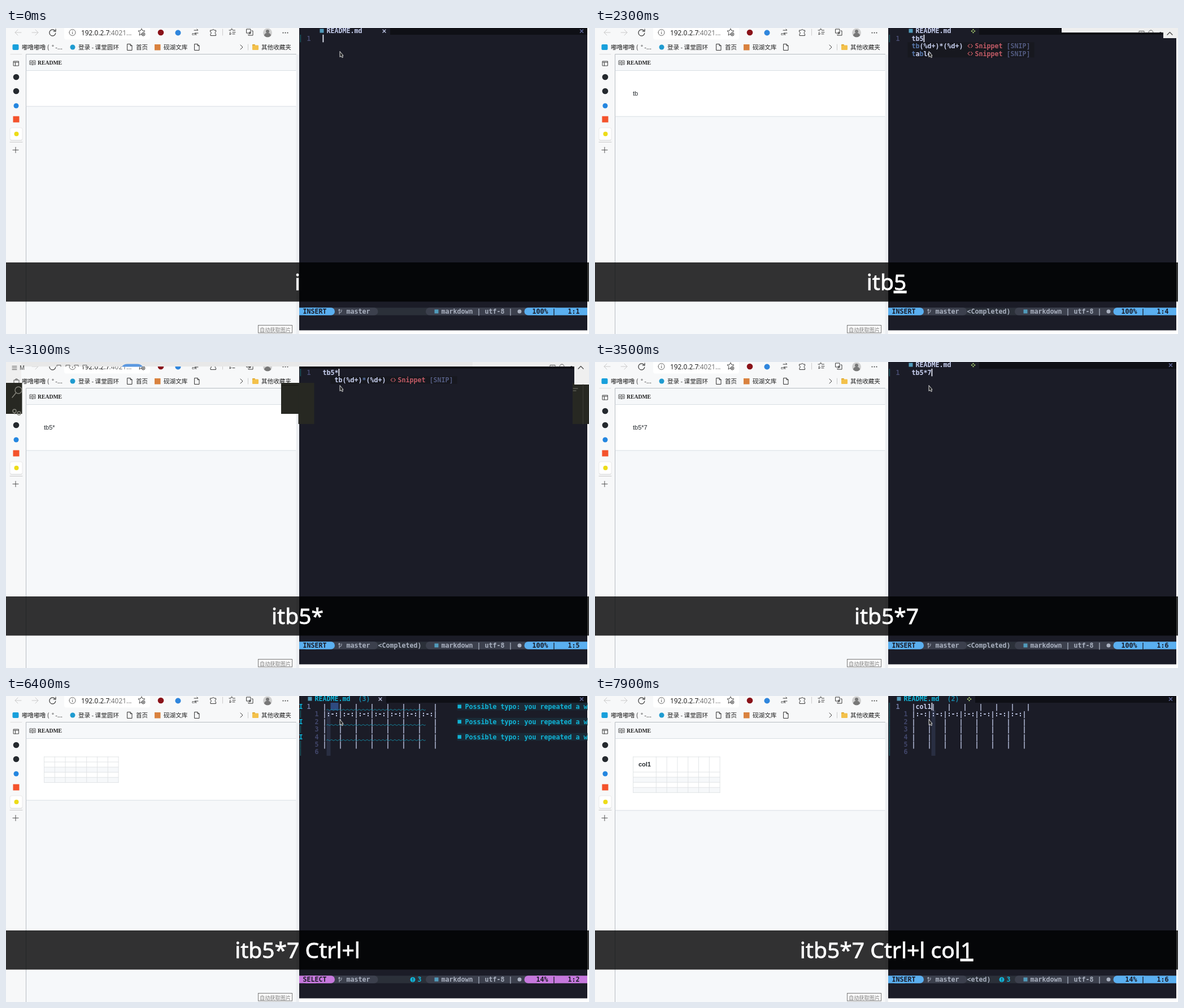
Recreate the animation shown at these times as an HTML page. Size 1032x543 px, loop 8000 ms.

```html
<!DOCTYPE html>
<html lang="zh">
<head>
<meta charset="utf-8">
<title>Table snippet</title>
<style>
html, body { margin: 0; width: 100%; height: 100%; overflow: hidden; background: #fff; }
svg { display: block; }
text { white-space: pre; }
.m { font: bold 11.63px "DejaVu Sans Mono", monospace; }
.ui { font-family: "Noto Sans", "Open Sans", sans-serif; }
.zh { font-family: "Noto Sans CJK SC", "Noto Sans CJK", sans-serif; }
.doc { font-family: "Liberation Sans", Arial, sans-serif; }
.serif { font-family: "Liberation Serif", serif; font-weight: bold; }
.keys { font: 39px "Noto Sans", "Open Sans", sans-serif; stroke: #fff; stroke-width: .8px; }
.last { text-decoration: underline; text-decoration-thickness: 2px; text-underline-offset: 3px; }
.ln { fill: none; stroke-linecap: round; stroke-linejoin: round; }
</style>
</head>
<body>
<svg id="stage" width="1032" height="543" viewBox="0 0 1032 543"><g id="base"></g><g id="live"></g></svg>
<script>
const LOOP = 8000, CW = 7, RH = 13.46, X0 = 518.5;
const BG = '#1b1c27', FG = '#c8d0f0', CYAN = '#10b3d6', BLUE = '#5aaff0', TEAL = '#519aba', DIM = '#525a80';
const esc = s => s.replace(/&/g, '&amp;').replace(/</g, '&lt;');
const rect = (x, y, w, h, fill, more = '') => `<rect x="${x}" y="${y}" width="${w}" height="${h}" fill="${fill}" ${more}/>`;
const dot = (x, y, r, fill) => `<circle cx="${x}" cy="${y}" r="${r}" fill="${fill}"/>`;
const line = (d, color, w = 1) => `<path class="ln" d="${d}" stroke="${color}" stroke-width="${w}"/>`;
const text = (x, y, s, size, fill, cls, more = '') =>
  `<text class="${cls}" x="${x}" y="${y}" font-size="${size}" fill="${fill}" ${more}>${esc(s)}</text>`;
const colX = c => X0 + c * CW;
const rowY = r => r * RH - 1.6;
const mono = (c, r, s, fill) => `<text class="m" x="${colX(c)}" y="${9.2 + r * RH}" fill="${fill}">${esc(s)}</text>`;
const cross = (x, y, r, color, w = 1.2) => line(`M${x - r} ${y - r}l${2 * r} ${2 * r}m0 ${-2 * r}l${-2 * r} ${2 * r}`, color, w);
const ring = (x, y, r) => `M${x - r} ${y}a${r} ${r} 0 1 0 ${2 * r} 0a${r} ${r} 0 1 0 ${-2 * r} 0`;
const sheet = x => line(`M${x - 4} 28.5h5l3 3v8h-8zm5 0v3h3`, '#333');

// ---- fixed parts ----
function browser() {
  const ink = '#3a3a3a', pale = '#c9c9c9';
  return rect(0, 0, 519, 543, '#f7f8f9') + rect(36, 47, 477, 496, '#f6f8fa') +
    rect(513.5, 47, 5, 496, '#eceef1') +
    rect(103, -10, 152, 30.5, '#fff', 'rx="4"') +
    line('M27 8h-11m5-5l-5 5l5 5M46 8h11m-5-5l5 5l-5 5', pale) +
    line('M87 5.5a5.5 5.5 0 1 0 .8 3.5M88 2v4h-4', ink, 1.2) +
    line(ring(117.5, 8, 5.5) + 'M117.5 7.5v3M117.5 5v.3', '#666') +
    text(133, 12.7, '192.0.2.7', 11.9, '#222', 'ui') +
    text(182.6, 12.7, ':4021...', 11.9, '#777', 'ui') +
    line('M244 7l2-2h-4l-2-4l-2 4h-4l3 3.500l-1 4.500l3.500-2' + ring(243, 11, 3) + 'M241.500 11h3M243 9.500v3', '#444') +
    dot(274, 8, 5.3, '#8a1219') + dot(304.5, 8.500, 5, '#2f86dd') +
    text(329, 13, 'en', 7, ink, 'ui') + line('M333 4h7l-2-2M340 9h-6l2 3', ink) +
    line('M362 4h3a1.800 1.800 0 0 1 3.500 0h3v3a1.800 1.800 0 0 0 0 3.500v3h-9.500v-3a1.800 1.800 0 0 0 0-3.500z', ink) +
    line('M383.5 2v11', '#ccc') +
    line('M395 4h3l1.500-3l2 3h4M397 7l-1 5l3-2M401 7.500h5M401 10.500h4', ink) +
    line('M426 2h7v7h-7zM429 11.500v1.500h8v-8h-2M431.500 7v4m-2-2h4', ink) +
    dot(463, 8.500, 8, '#cfcfcf') + dot(463, 6, 3, '#777') + `<path d="M457 13.500a6 5 0 0 1 12 0a8 8 0 0 1-12 0" fill="#777"/>` +
    [490.5, 494.5, 498.5].map(x => dot(x, 8.500, 1, ink)).join('') +
    rect(11.5, 29, 11, 10, '#18a0dc', 'rx="2"') +
    text(28, 38, '嘟噜嘟噜 (  ° -...', 10.6, '#222', 'zh') +
    dot(118, 34, 4.5, '#1f9bd0') + text(128, 38, '登录 - 课堂圆环', 10.6, '#222', 'zh') +
    sheet(219) + text(230, 38, '首页', 10.6, '#222', 'zh') +
    rect(263, 29, 10.5, 10.5, '#d9823f') + text(279, 38, '砚湖文库', 10.6, '#222', 'zh') + sheet(338) +
    line('M415 30l4 4l-4 4', ink) + line('M428.5 29v10', '#ccc') +
    rect(436, 29, 5, 4, '#d9a02c', 'rx="1"') + rect(436, 30.5, 11, 8.500, '#f3c14b', 'rx="1"') +
    text(452, 38, '其他收藏夹', 10.6, '#222', 'zh') +
    line('M35.500 543V46.500H513.500', '#b8bdc2') + line('M8 46.500h20', '#ddd') +
    line('M13.500 59h9v8h-9zm0 2h9m-6 0v6', '#444') +
    dot(18, 87, 5.3, '#24292e') + dot(18, 112, 5.3, '#24292e') + dot(18, 138, 4.500, '#2386e0') +
    rect(12.5, 156.500, 11, 11, '#f4532c') +
    rect(7, 178, 22, 22, '#00000022', 'rx="3"') + rect(7, 177, 22, 22, '#fff', 'rx="3" stroke="#ddd" stroke-width=".6"') +
    dot(18.5, 188, 4, '#eddc18') + line('M7 202.500h22', '#c8c8c8') + line('M12 216.500h10m-5-5v10', '#555') +
    line('M36 75.500h477', '#d8dee4') +
    line('M47 58.500q-2.500-1.500-5-.500v7q2.500-1 5 .500q2.500-1.500 5-.500v-7q-2.500-1-5 .500v7M43.500 60.500h2m-2 2h2m3-2h2m-2 2h2', '#444', .9) +
    text(56, 64.8, 'README', 9.7, '#222', 'serif') +
    rect(446.5, 527.5, 60, 13.500, '#fff', 'stroke="#777"') + text(449, 538.5, '自动获取图片', 9.2, '#777', 'zh');
}

// ---- page preview ----
const pen = document.createElement('canvas').getContext('2d');
pen.font = 'bold 11px "Liberation Sans", Arial, sans-serif';

function grid(cell) {
  const step = 18.8, left = 67.5, top = 108;
  const head = cell ? 27 : 9.1, first = step + (cell ? pen.measureText(cell).width : 0);
  const w = first + 6 * step, h = head + 4 * 9.1, y = i => top + head + i * 9.1;
  let out = rect(left, y(1), w, 9.1, '#f6f8fa') + rect(left, y(3), w, 9.1, '#f6f8fa'), d = `M${left} ${top}h${w}`;
  for (let i = 0; i < 5; i++) d += `M${left} ${y(i)}h${w}`;
  d += `M${left} ${top}v${h}`;
  for (let i = 0; i < 7; i++) d += `M${left + first + i * step} ${top}v${h}`;
  return out + line(d, '#dfe2e5', .9) +
    (cell ? text(left + 9.4, 125, cell, 11, '#24292e', 'doc', 'font-weight="bold"') : '');
}

function preview(s) {
  const bottom = s.table ? (s.doc ? 203 : 185) : s.doc ? 157 : 139;
  return rect(36, 76, 477.5, bottom - 76, '#fff') + line(`M36 ${bottom}h477`, '#d8dee4') +
    (s.table ? grid(s.doc) : text(67, 120, s.doc, 11, '#24292e', 'doc'));
}

// ---- editor ----
const SIZES = ['3x3', '5x1', '3x1', '4x1', '2x2', '4x3', '3x2', '4x2'];
const MENUS = {
  t: ['task', 'task1', 'task2', 'task3', 'task4', 'table', 'tb(%d+)*(%d+)', ...SIZES.map(n => n + 'table')],
  tb: ['tb(%d+)*(%d+)', 'table'],
  '*': ['tb(%d+)*(%d+)']
};

function marked(c, r, label, query) {
  let q = query;
  const spans = [...label].map(ch => {
    const hit = ch === q[0];
    if (hit) q = q.slice(1);
    return `<tspan fill="${hit ? '#5878ad' : FG}">${ch}</tspan>`;
  }).join('');
  return `<text class="m" x="${colX(c)}" y="${9.2 + r * RH}">${spans}</text>`;
}

function menu(query) {
  const items = MENUS[query], c = query === '*' ? 9 : 6, x = colX(c), h = items.length * RH;
  let out = rect(x - 7, rowY(2), 224, h, '#17181f');
  if (items.length > 9) out += rect(x + 217, rowY(2), 7, h, '#17181f') + rect(x + 217, rowY(2), 7, 162, '#3b4261');
  items.forEach((label, i) => {
    const y = 5 + (i + 2) * RH;
    out += marked(c, i + 2, label, query) +
      line(`M${x + 102.500} ${y - 3}l-3 3l3 3M${x + 105} ${y - 3}l3 3l-3 3`, '#c05a62', 1.2) +
      mono(c + 16, i + 2, 'Snippet', '#c05a66') + mono(c + 24, i + 2, '[SNIP]', DIM);
  });
  return out;
}

function tabline(s) {
  const c = s.count ? 4 : 7, end = s.count ? 673 : 680, x = s.count ? 662.5 : 669.5;
  const name = s.count ? CYAN : FG;
  return rect(end, 0, 1029 - end, 12, '#0f1016') + rect(colX(c) - 12, 1.5, 7, 7, TEAL) +
    mono(c, 0, 'README.md', name) + (s.count ? mono(15, 0, `(${s.count})`, '#1788a8') : '') +
    (s.mod ? [[0, -2.5], [0, 2.5], [-2.5, 0], [2.5, 0]].map(p => dot(x + p[0], 5.5 + p[1], 1.2, '#a3c76d')).join('')
      : cross(x, 5.5, 2.5, FG)) +
    cross(1019, 5.5, 2.5, '#5a6292', 1.7);
}

const curl = (x, r, n) => line(`M${x} ${rowY(r + 1) - .8}` + 'q1.75 -2 3.5 0t3.5 0'.repeat(n), '#1590ab', .9);
const hint = (r, s) => rect(colX(40), rowY(r), 231, RH, '#1a2b37') + rect(799.5, r * RH + 2, 6.500, 6.500, CYAN) +
  mono(42, r, s, CYAN);

function tableText(s) {
  const select = s.mode === 'SELECT', col = 7 + s.cell.length;
  const notes = !select ? [] : s.diag === 1 ? [1] : [1, 3, 5];
  let out = rect(colX(col), rowY(2), 7, 6 * RH, '#292e42');
  if (select) out += rect(colX(8), rowY(1), 14, RH, '#2e4a80');
  for (let r = 1; r < 8; r++) {
    out += notes.includes(r) ? mono(0, r, 'I', CYAN) : rect(520.5, rowY(r), 1.6, RH, '#215a63');
    out += r === 1 ? mono(2, 1, '1', '#7077a0') : mono(4, r, String(r - 1), '#41466a');
    if (r === 7) continue;
    const body = r === 2 ? '|' + ':-:|'.repeat(7) : '|' + '   |'.repeat(7);
    out += mono(6, r, r === 1 && !select ? `|${s.cell}|` + '   |'.repeat(6) : body, FG);
  }
  notes.forEach(r => {
    out += s.diag === 1 ? curl(colX(6), r, 3) + hint(r, 'This sentence does not start wi')
      : curl(colX(7), r, 25) + hint(r, 'Possible typo: you repeated a w');
  });
  if (s.cur) out += rect(colX(col), rowY(1), select ? 7 : 1.8, RH, '#d5d9e8');
  return out;
}

function lineText(s) {
  return rect(520.5, rowY(1), 1.6, RH, '#215a63') + mono(2, 1, '1', '#484b70') + mono(6, 1, s.text, FG) +
    (s.cur ? rect(colX(6 + s.text.length), rowY(1), 1.8, RH, '#e6e9f5') : '') + (s.menu ? menu(s.menu) : '');
}

function status(s) {
  const y = 496.3, h = 13.4, pill = s.mode === 'SELECT' ? '#c678dd' : BLUE, gray = '#a9b0bf', seg = '#3c404d';
  const at = s.table ? s.cell.length + 2 : s.text.length + 1;
  return rect(519, y, 510, h, '#2b3039') + rect(560, y, 98.500, h, seg, 'rx="6.7"') + rect(743, y, 200, h, seg, 'rx="6.7"') +
    rect(519, y, 30, h, pill) + rect(525, y, 57, h, pill, 'rx="6.7"') +
    rect(917.5, y, 60, h, pill, 'rx="6.7"') + rect(940, y, 89, h, pill) +
    mono(1, 37, s.mode, BG) + line('M590 499v8.500m0-2q4-1 4-4v-1.500m-5.500 1l1.500-2l1.500 2', gray, 1.1) + mono(12, 37, 'master', gray) +
    mono(20, 37, s.msg, gray) +
    (s.diag ? dot(720, 503.200, 4.500, CYAN) + rect(719.4, 500.5, 1.300, 3.500, '#2b3039') + rect(719.4, 505, 1.300, 1.300, '#2b3039') +
      mono(30, 37, String(s.diag), CYAN) : '') +
    rect(758.5, 499.500, 7, 7, TEAL) + mono(36, 37, 'markdown | utf-8 |', gray) + dot(909, 503, 3.500, gray) +
    (s.table ? mono(60, 37, '14%', BG) : mono(59, 37, '100%', BG)) + mono(64, 37, '|', BG) + mono(68, 37, '1:' + at, BG);
}

const editor = s => rect(519, 0, 510, 536.5, BG) + tabline(s) + (s.table ? tableText(s) : lineText(s)) + status(s);

// ---- torn pieces of other windows ----
const DARK = '#272822', LIGHT = '#efefef';

function corner() {
  return rect(826, 0, 181, 8, LIGHT) + rect(1006, 0, 26, 18, LIGHT) +
    line('M963 8v-2.500h9v2.500M966 8h3M980 8a4 4 0 0 1 8 0M1000 7.500h2', '#555') + line('M1013 12l4.500-4.500l4.500 4.500', '#444', 1.2);
}

function tabStrip() {
  const label = (x, s, fill) => text(x, 12, s, 11, fill, 'ui');
  const tabs = [[116, 'plugins.lua', '.../lang', 189], [262, 'index.js'], [362, 'event.lua'],
    [463, 'plugins.lua', '.../tools', 534], [610, 'plugins.lua', '.../completion', 682]];
  let out = rect(0, 0, 1032, 18, '#34352f') + rect(771, 0, 261, 18, DARK) + rect(0, 0, 39, 18, DARK) +
    rect(518, 18, 28, 19, DARK) + rect(1003, 18, 29, 19, DARK) + rect(545, 20, 458, 17, BG) +
    rect(colX(6), 20, 1.8, 5.500, '#e6e9f5') + rect(487, 139, 26.5, 18.5, '#fff') +
    line('M11 18V8h5m0-4h8l4 4v10H16z', '#85857c', 1.2) + label(43, '.../lang', '#8c8c84');
  for (const x of [100, 245, 345, 446, 594, 771]) out += rect(x, 0, 1, 18, '#1e1f1c');
  tabs.forEach(([x, name, dir, dx], i) => {
    out += (i === 1 ? rect(x - 5, 4, 9, 9, '#cbcb41') : dot(x, 8, 4.800, TEAL)) + label(x + 11 - (i === 1), name, '#c5c5bf') +
      (dir ? label(dx, dir, '#8c8c84') : '');
  });
  return out + dot(788, 8, 4.800, TEAL) + label(798, 'config.lua', '#e2c08d') + label(854, '.../completion', '#a28d6b') +
    label(924, 'M', '#a28d6b') + cross(945, 8, 3.500, '#ddd') +
    line(ring(966, 4, 2) + ring(973, 12, 2) + 'M966 6v6h4M973 10V4h-4M987 3h10v10h-10zm5 0v10', '#c5c5bf') +
    [1009, 1013.5, 1018].map(x => dot(x, 8, 1, '#ccc')).join('');
}

function torn() {
  return rect(0, 0, 1032, 8, '#e8e8e8') + rect(0, 0, 27, 37, LIGHT) +
    line('M11 7.500h8m-8 3h8m-8 3h8', '#555') + text(24, 14, 'M', 10, '#444', 'ui') +
    line('M90 8V5.500h7V8M106 8V5.500h7V8M121 8V5.500h7V8M136 8V5.500h7V8', '#666') +
    `<path d="M205 8.500q3-5 10-5h17q7 0 10 5z" fill="#5b98e0"/>` + line('M14 38v-6h9v6m-6-6v-2h3v2', '#555') +
    rect(519, 8, 487, 4, '#0f1016') + rect(0, 37, 28.5, 55, DARK) + rect(487, 37, 31, 55, DARK) + rect(487, 41, 58, 1, '#1a1b17') +
    rect(517.5, 37, 28, 73, DARK) + rect(1003, 37, 29, 73, DARK) + rect(1006, 0, 26, 40, LIGHT) +
    line(ring(22, 50, 6) + 'M17.5 55l-6.500 8' + ring(15, 87, 3) + 'M15 90v2' + ring(23, 91, 3), '#85857c', 1.4) +
    line('M1004 47h8m-8 4h5', '#77776f') + line('M1021.500 40v70', '#3a3b35') + corner();
}

// ---- timeline ----
const DONE = '<Completed)';
const STEPS = [
  [0, { keys: 'i', last: '', text: '', cell: '', doc: '', menu: '', msg: '', mode: 'INSERT', cur: 1, mod: 0, count: 0, diag: 0, table: 0, tear: null }],
  [500, { cur: 0 }],
  [1000, { cur: 1 }],
  [1200, { last: 't', text: 't', menu: 't', msg: DONE, mod: 1, tear: tabStrip }],
  [1300, { doc: 't', tear: corner }],
  [1400, { keys: 'it', last: 'b', text: 'tb', menu: 'tb' }],
  [1500, { doc: 'tb' }],
  [1600, { keys: 'itb', last: '' }],
  [1900, { cur: 0 }],
  [2000, { msg: '' }],
  [2300, { last: '5', text: 'tb5', cur: 1, msg: DONE }],
  [2400, { doc: 'tb5' }],
  [2500, { keys: 'itb5', last: '' }],
  [2700, { last: '*', text: 'tb5*', doc: 'tb5*', menu: '*' }],
  [2900, { keys: 'itb5*', last: '' }],
  [3100, { tear: torn }],
  [3200, { tear: null }],
  [3300, { last: '7', text: 'tb5*7', menu: '' }],
  [3400, { doc: 'tb5*7' }],
  [3500, { keys: 'itb5*7', last: '' }],
  [3700, { msg: '' }],
  [3800, { cur: 0 }],
  [4300, { cur: 1 }],
  [4600, { keys: 'itb5*7 ', last: 'Ctrl+l', table: 1, doc: '', mode: 'SELECT', mod: 0, count: 1, diag: 1, msg: '<ress)' }],
  [4700, { count: 3, diag: 3 }],
  [4800, { keys: 'itb5*7 Ctrl+l', last: '' }],
  [5200, { msg: '<eted)' }],
  [5400, { cur: 0 }],
  [5900, { cur: 1 }],
  [6100, { msg: '' }],
  [6400, { cur: 0 }],
  [6800, { keys: 'itb5*7 Ctrl+l ', last: 'c', cell: 'c', mode: 'INSERT', cur: 1, mod: 1, count: 2, msg: '<ress)' }],
  [6900, { keys: 'itb5*7 Ctrl+l c', last: 'o', cell: 'co' }],
  [7000, { doc: 'co', msg: '<eted)' }],
  [7100, { keys: 'itb5*7 Ctrl+l co', last: '' }],
  [7500, { last: 'l', cell: 'col' }],
  [7600, { doc: 'col' }],
  [7700, { keys: 'itb5*7 Ctrl+l col', last: '' }],
  [7800, { last: '1', cell: 'col1' }],
  [7900, { doc: 'col1' }]
];
let state = {};
const states = STEPS.map(([, change]) => state = { ...state, ...change });

const mouse = '<path d="M591 41.500v10l2.200-1.800l1.800 3l1.600-.900l-1.500-2.800h2z" fill="#222" stroke="#ddd" stroke-width="1"/>';
const caption = s => rect(0, 416, 1032, 69.5, '#000', 'fill-opacity=".8"') +
  `<text class="keys" x="516" y="464.500" fill="#fff" text-anchor="middle">${s.keys}<tspan class="last">${s.last}</tspan></text>`;

const live = document.getElementById('live');
document.getElementById('base').innerHTML = browser();
let shown = -1;

function tick(now) {
  const t = now % LOOP;
  const i = STEPS.filter(([at]) => at <= t).length - 1;
  if (i !== shown) {
    const s = states[shown = i];
    live.innerHTML = preview(s) + editor(s) + (s.tear ? s.tear() : '') + mouse + caption(s);
  }
  requestAnimationFrame(() => tick(performance.now()));
}
tick(performance.now());
</script>
</body>
</html>
```
